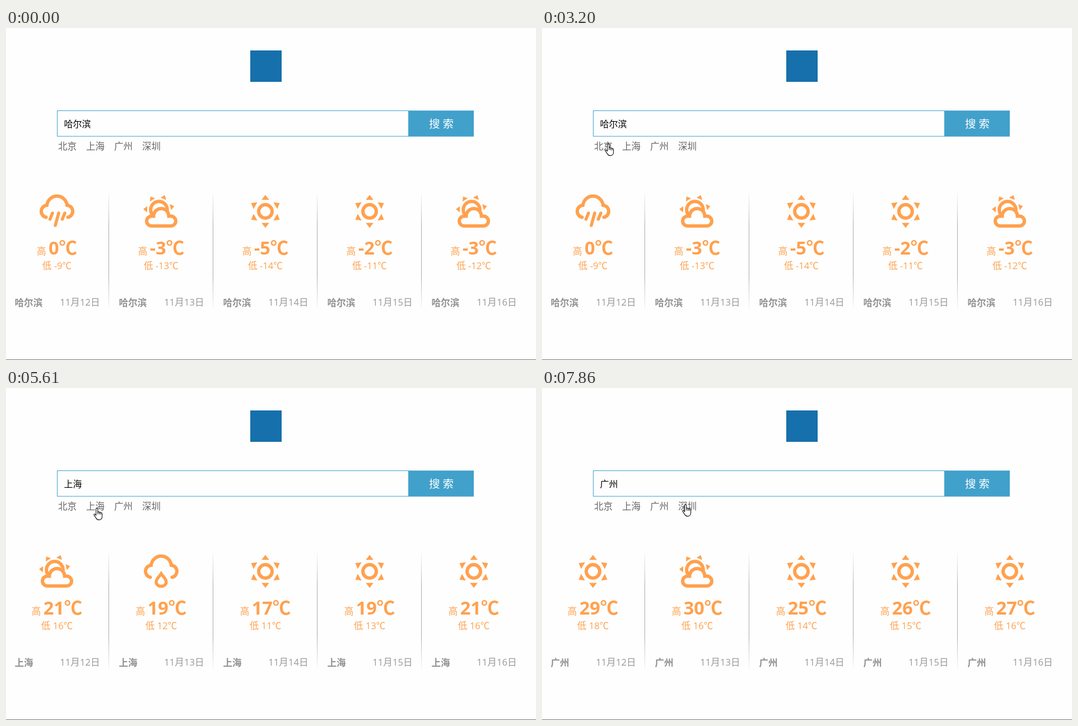
Recreate the animation shown at these times as an HTML page. Size 946 by 592 pixels, loop 8 s.

```html
<!DOCTYPE html>
<html lang="zh-CN">
<head>
<meta charset="utf-8">
<title>天气查询</title>
<style>
  html, body { margin: 0; width: 100%; height: 100%; overflow: hidden; background: #fefefe; }
  svg { display: block; width: 100%; height: 100%; }
  text { font-family: "Open Sans", "Noto Sans CJK SC", "Noto Sans CJK", sans-serif; font-size: 16.6px; white-space: pre; }
  .mid { text-anchor: middle; }
  .end { text-anchor: end; }
  .card { fill: #ffa14f; }
  .high { font-size: 32.5px; font-weight: 700; }
  .foot { fill: #999; }
  .city { font-weight: 700; fill: #929292; }
  .line { fill: none; stroke: #ffa14f; stroke-width: 6; }
  .ring {
    width: 38px; height: 38px; border-radius: 50%;
    background: conic-gradient(rgba(255,255,255,.05), rgba(255,255,255,.25) 35%, rgba(255,255,255,.8) 65%, #fff);
    -webkit-mask: radial-gradient(circle, transparent 14.8px, #000 15.8px, #000 18.2px, transparent 19px);
    mask: radial-gradient(circle, transparent 14.8px, #000 15.8px, #000 18.2px, transparent 19px);
  }
</style>
</head>
<body>
<svg viewBox="0 0 946 592" preserveAspectRatio="none">
  <defs>
    <linearGradient id="fade" gradientUnits="userSpaceOnUse" x1="0" y1="288" x2="0" y2="507">
      <stop offset="0" stop-color="#aaa" stop-opacity="0"/>
      <stop offset=".3" stop-color="#aaa"/>
      <stop offset=".7" stop-color="#aaa"/>
      <stop offset="1" stop-color="#aaa" stop-opacity="0"/>
    </linearGradient>
  </defs>
  <rect width="946" height="592" fill="#fefefe"/>
  <rect x="436" y="40" width="56" height="56" fill="#1670ab"/>

  <rect x="91.5" y="147.5" width="627" height="45.6" fill="#fefefe" stroke="#41a1cb"/>
  <rect x="718" y="147.2" width="117" height="46.4" fill="#41a1cb"/>
  <text id="query" x="103.5" y="177" style="font-size:16px" fill="#000"></text>
  <rect id="caret" x="151" y="161" width="1" height="19" fill="#000"/>
  <text id="label" class="mid" x="777" y="178" style="font-size:19.5px" fill="#fff">搜 索</text>
  <foreignObject id="spinner" x="758" y="149" width="38" height="38"><div class="ring" id="ring"></div></foreignObject>

  <g id="links" fill="#666"></g>
  <g id="lines"></g>
  <g id="cards"></g>
  <rect y="591" width="946" height="1" fill="#777"/>

  <g id="arrow" fill="#fff" stroke="#111" stroke-linejoin="round">
    <path d="M.5 .5V16.3L4.1 12.9L6.7 18.6L9.1 17.5L6.5 12H11.5Z"/>
  </g>
  <g id="hand" fill="#fff" stroke="#111" stroke-width="1.1" stroke-linejoin="round">
    <path d="M4.7 13.6V2.2A1.6 1.6 0 0 1 7.9 2.2V7.6Q9.4 6.4 10.6 8.2Q12.1 7.3 13.2 9Q15.6 8.3 15.6 11V15.2Q15.6 21.6 9.6 21.6Q6.6 21.6 5 18.9L1.1 13.1Q.6 11.2 2.6 11.4Z"/>
    <path fill="none" d="M7.9 7.4V11.6M10.6 8.4V11.8M13.2 9.2V12.2"/>
  </g>
</svg>
<script>
const LOOP = 8000;
const $ = id => document.getElementById(id);
const show = (el, on) => el.style.display = on ? '' : 'none';

// icons are centred on 0,0
const ray = (angle, base, tip, half) =>
  `<path transform="rotate(${angle})" d="M0 ${-tip}L${half} ${-base}H${-half}Z"/>`;
const rays = (n, start, step, ...size) =>
  Array.from({ length: n }, (_, i) => ray(start + i * step, ...size)).join('');
const cloud = '<path class="line" stroke-linecap="round" d="M-19.5 10.5A10.9 10.9 0 0 1-18-11A18.1 18.1 0 0 1 18-11A10.9 10.9 0 0 1 19.5 10.5"/>';
const icons = {
  sun: '<circle class="line" r="12"/>' + rays(6, 0, 60, 20.5, 29.5, 6.8),
  partly: `<g transform="translate(-4 -3)"><circle class="line" r="14.8"/>${rays(4, -88, 55, 21, 28, 5.5)}</g>
    <path class="line" style="fill:#fefefe" d="M-17.3 26A8.7 8.7 0 0 1-17.3 8.6H-13.6A13.6 13.6 0 0 1 13.6 8.6H17.3A8.7 8.7 0 0 1 17.3 26Z"/>`,
  rain: cloud + '<path class="line" stroke-linecap="round" style="stroke-width:5.5" d="M-8 3L-12.5 14M3 3L-3 25M14 3L9.5 14"/>',
  drop: cloud + '<path class="line" style="stroke-width:5.5" d="M0 4C4 10 9 14 9 19A9 7.5 0 0 1-9 19C-9 14-4 10 0 4Z"/>'
};

// each day: icon, high, low
const cities = {
  '哈尔滨': 'rain 0 -9,partly -3 -13,sun -5 -14,sun -2 -11,partly -3 -12',
  '北京': 'partly 19 5,sun 8 -3,sun 8 -2,sun 12 -1,sun 12 3',
  '上海': 'partly 21 16,drop 19 12,sun 17 11,sun 19 13,sun 21 16',
  '广州': 'sun 29 18,partly 30 16,sun 25 14,sun 26 15,sun 27 16'
};

function card(city, day, i) {
  const [icon, high, low] = day.split(' ');
  return `<g class="card" transform="translate(${91 + i * 186} 0)">
    <g transform="translate(0 327)">${icons[icon]}</g>
    <text class="mid" y="404">高 <tspan class="high">${high}℃</tspan></text>
    <text class="mid" y="430">低 ${low}℃</text>
    <text class="foot city" x="-75.5" y="495.5">${city}</text>
    <text class="foot end" x="76.5" y="495">11月${12 + i}日</text></g>`;
}

$('cards').innerHTML = Object.entries(cities).map(([city, days]) =>
  `<g>${days.split(',').map((day, i) => card(city, day, i)).join('')}</g>`).join('');
$('links').innerHTML = ['北京', '上海', '广州', '深圳'].map((name, i) =>
  `<text x="${93 + i * 50}" y="217">${name}</text>`).join('');
$('lines').innerHTML = [0, 1, 2, 3].map(i =>
  `<rect x="${183 + i * 186}" width="1" fill="url(#fade)"/>`).join('');

const names = Object.keys(cities);
const groups = [...$('cards').children];
const dividers = [...$('lines').children];

// start of loading, results ready, city index
const searches = [[-1, -1, 0], [730, 1390, 0], [3600, 4030, 1], [5040, 5610, 2], [6870, 7430, 3]];
const blinks = [[300, 860], [1390, 1930], [2350, 2920]];
// time, left, top, pointer shape
const moves = [
  [1930, 94, 196, 'arrow'], [2070, 136, 222, 'arrow'], [2210, 186, 217, 'hand'], [2350, 220, 206, 'hand'],
  [2780, 190, 206, 'hand'], [2920, 158, 206, 'hand'], [3060, 128, 206, 'hand'], [3200, 112, 206, 'hand'],
  [3890, 115, 207, 'hand'], [4030, 118, 208.5, 'hand'], [4180, 129, 210, 'hand'], [4330, 141, 211, 'hand'],
  [4470, 150, 212, 'hand'], [4610, 156, 213.5, 'hand'],
  [6040, 194, 213, 'hand'], [6170, 220, 212, 'hand'], [6470, 213, 211, 'hand'], [6600, 207, 211.5, 'hand'],
  [7710, 230, 209, 'hand'], [7860, 250, 207, 'hand']
];
const latest = (list, t) => list.filter(item => item[0] <= t).pop();

function draw(t) {
  const [start, ready, city] = latest(searches, t);
  const loading = t < ready;
  $('query').textContent = names[city];
  show($('label'), !loading);
  show($('spinner'), loading);
  const turn = Math.floor((t - start) / 140) * 50;
  $('ring').style.transform = `rotate(${turn}deg)`;
  groups.forEach((g, i) => show(g, !loading && i === city));

  show($('lines'), !loading);
  const inset = start < 0 ? 7 : 0;
  for (const d of dividers) {
    d.setAttribute('y', 290 + inset);
    d.setAttribute('height', 215 - inset * 2);
  }

  show($('caret'), blinks.some(([a, b]) => t >= a && t < b));
  const move = latest(moves, t);
  for (const shape of ['arrow', 'hand']) {
    const on = move && move[3] === shape;
    show($(shape), on);
    if (on) $(shape).setAttribute('transform', `translate(${move[1]} ${move[2]})`);
  }
}

const origin = performance.now();
function tick() {
  draw((performance.now() - origin) % LOOP);
  requestAnimationFrame(tick);
}
tick();
</script>
</body>
</html>
```
